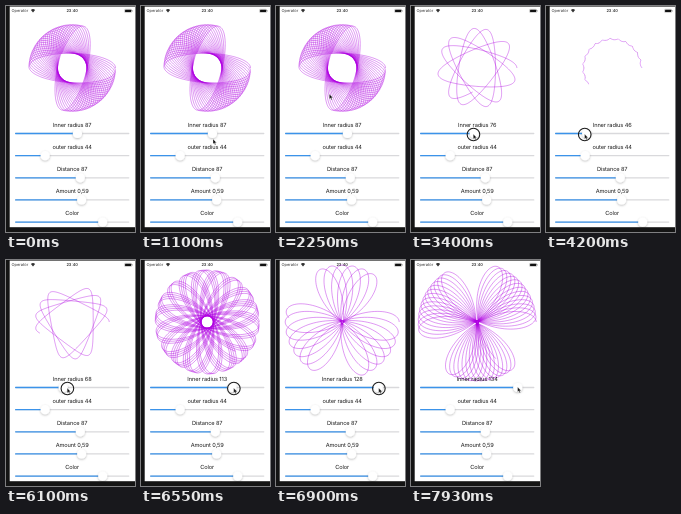
These frames come from a looping animation (129x226 px, 8000 ms). An HTML page:

```html
<!DOCTYPE html>
<html lang="sv">
<head>
<meta charset="utf-8">
<title>Spirograph</title>
<style>
  html, body { margin: 0; width: 100%; height: 100%; overflow: hidden; background: #141414; }
  svg { display: block; width: 100vw; height: 100vh; }
  text { font-family: Inter, Roboto, sans-serif; fill: #1c1c1c; text-rendering: geometricPrecision; }
  .label { font-size: 5.67px; letter-spacing: -.1px; text-anchor: middle; }
  .status { font-size: 4px; fill: #333; }
  .rail { fill: #d9d9dc; }
  .fill { fill: #3b93ea; }
</style>
</head>
<body>
<svg id="stage" viewBox="0 0 129 226">
  <defs>
    <filter id="shadow" x="-50%" y="-50%" width="200%" height="200%">
      <feDropShadow dx="0" dy=".9" stdDeviation=".9" flood-color="#000" flood-opacity=".28"/>
    </filter>
  </defs>
  <rect width="129" height="226" fill="#141414"/>
  <rect x="3.7" y=".6" width="125.3" height="220.6" fill="#fff"/>

  <g id="status">
    <text class="status" x="5.4" y="6.4">Operatör</text>
    <path d="M24.9 4a3 3 0 0 1 4.2 0L27 6.4z" fill="#333"/>
    <text class="status" x="66.2" y="6.4" text-anchor="middle" font-weight="600">23:40</text>
    <rect x="118.5" y="3.3" width="7.2" height="3.2" rx=".8" fill="none" stroke="#777" stroke-width=".35"/>
    <rect x="119" y="3.8" width="6.2" height="2.2" rx=".4" fill="#111"/>
    <rect x="126.1" y="4.3" width=".5" height="1.2" fill="#777"/>
  </g>

  <path id="curve" fill="none" stroke="#ae00e0" stroke-width=".4" stroke-linejoin="round"/>
  <g id="controls"></g>
  <circle id="ring" r="6.3" cy="128.5" fill="none" stroke="#1c1c1c" stroke-width="1.1"/>
  <path id="cursor" d="M0 0V5L1.2 4 2 5.9 2.9 5.5 2.1 3.7H3.6Z" fill="#111" stroke="#fff" stroke-width=".35"/>
</svg>
<script>
const LOOP = 8000, STEP = 50;
const OUTER = 44, DISTANCE = 87, AMOUNT = 0.59;
const CENTER = { x: 66.2, y: 62 }, SCALE = 1 / 3;
const RAIL_LEFT = 9, RAIL_WIDTH = 114.4, RAIL_HEIGHT = 1.3, THUMB = 4.6;

// [time, inner radius]
const radiusKeys = [
  [3000, 87], [3200, 82], [3400, 76], [3800, 66], [3900, 63], [4300, 40],
  [4650, 24], [5050, 22], [5400, 17], [5550, 17], [5800, 34], [6100, 68],
  [6350, 103], [6600, 116], [6900, 128], [7200, 134]
];

// [time, x, y] of the pointer tip before the drag
const pointerKeys = [
  [400, 26, 101], [750, 77, 189], [1100, 72, 133], [1850, 72, 133],
  [2000, 101, 82], [2130, 72, 53], [2250, 53.3, 88], [2650, 49.5, 93],
  [2700, 49.5, 93], [2750, 74.5, 130.5], [2950, 74.5, 130.5], [3000, 71.2, 128]
];

const byId = id => document.getElementById(id);
const controls = byId("controls");

function sample(keys, t) {
  if (t <= keys[0][0]) return keys[0].slice(1);
  for (let i = 1; i < keys.length; i++) {
    const [t0, ...a] = keys[i - 1], [t1, ...b] = keys[i];
    if (t <= t1) {
      const k = (t - t0) / (t1 - t0);
      return a.map((v, j) => v + (b[j] - v) * k);
    }
  }
  return keys[keys.length - 1].slice(1);
}

function add(name, attrs) {
  const node = document.createElementNS("http://www.w3.org/2000/svg", name);
  for (const key in attrs) node.setAttribute(key, attrs[key]);
  return controls.appendChild(node);
}

const thumbX = f => RAIL_LEFT + THUMB + f * (RAIL_WIDTH - 2 * THUMB);
const radiusX = r => thumbX((r - 10) / 140);

function addSlider(row, text, fraction) {
  const y = 127.5 + row * 22.15, x = thumbX(fraction);
  const label = add("text", { class: "label", x: CENTER.x, y: y - 6.7 });
  label.textContent = text;
  const rail = { x: RAIL_LEFT, y: y - RAIL_HEIGHT / 2, height: RAIL_HEIGHT, rx: RAIL_HEIGHT / 2 };
  add("rect", { ...rail, class: "rail", width: RAIL_WIDTH });
  const fill = add("rect", { ...rail, class: "fill", width: x - RAIL_LEFT });
  const thumb = add("circle", { cx: x, cy: y, r: THUMB, fill: "#fff", filter: "url(#shadow)" });
  return { label, fill, thumb };
}

const inner = addSlider(0, "", 0.55);
addSlider(1, "outer radius 44", 34 / 140);
addSlider(2, "Distance 87", 86 / 149);
addSlider(3, "Amount 0,59", AMOUNT);
addSlider(4, "Color", 0.79);

const gcd = (a, b) => b ? gcd(b, a % b) : a;

function spirograph(radius) {
  const diff = radius - OUTER, ratio = diff / OUTER;
  const end = Math.ceil(2 * Math.PI * OUTER / gcd(radius, OUTER)) * AMOUNT;
  const points = [];
  for (let a = 0; a <= end; a += 0.04) {
    const x = diff * Math.cos(a) + DISTANCE * Math.cos(ratio * a);
    const y = diff * Math.sin(a) - DISTANCE * Math.sin(ratio * a);
    points.push((CENTER.x + x * SCALE).toFixed(2) + " " + (CENTER.y + y * SCALE).toFixed(2));
  }
  return "M" + points.join("L");
}

let shown = null;
function showRadius(radius) {
  if (radius === shown) return;
  shown = radius;
  const x = radiusX(radius);
  inner.label.textContent = "Inner radius " + radius;
  inner.fill.setAttribute("width", x - RAIL_LEFT);
  inner.thumb.setAttribute("cx", x);
  byId("curve").setAttribute("d", spirograph(radius));
}

function draw(time) {
  const t = Math.floor(time / STEP) * STEP;
  showRadius(Math.round(sample(radiusKeys, t)[0]));

  // The pointer runs slightly ahead of the thumb while dragging.
  const dragX = radiusX(sample(radiusKeys, t + 40)[0]);
  const [x, y] = t < 3000 ? sample(pointerKeys, t) : [dragX - 0.2, t < 7850 ? 128 : 127];
  byId("cursor").setAttribute("transform", `translate(${x} ${y})`);
  byId("cursor").style.display = t < 250 ? "none" : "";
  byId("ring").setAttribute("cx", dragX);
  byId("ring").style.display = t >= 3000 && t < 7850 ? "" : "none";
}

function tick() {
  draw(performance.now() % LOOP);
  requestAnimationFrame(tick);
}
tick();
</script>
</body>
</html>
```
